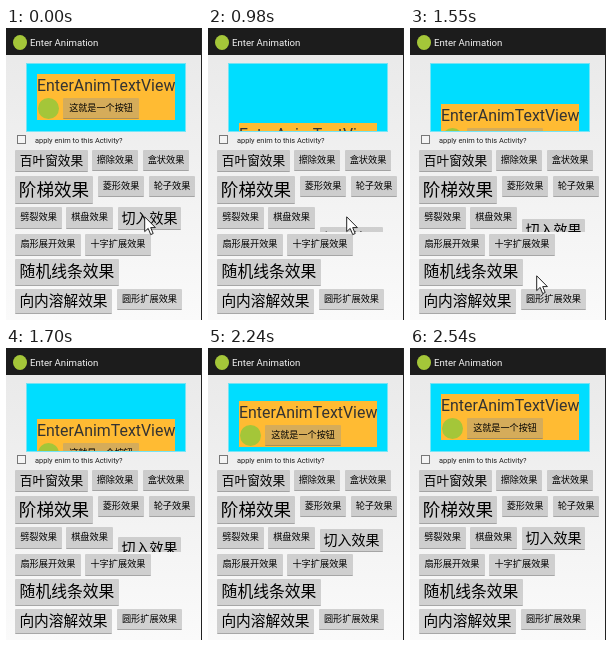
An HTML page that plays this animation: 196x292 px, repeating every 2850 ms.

```html
<!DOCTYPE html>
<html lang="en">
<head>
<meta charset="utf-8">
<title>Enter Animation</title>
<style>
  html, body { margin: 0; width: 100%; height: 100%; overflow: hidden; }
  #stage {
    position: relative; width: 196px; height: 292px; overflow: hidden;
    background: linear-gradient(#e8e8e8, #fafafa);
    font-family: Roboto, sans-serif; color: #222;
  }
  #stage div, #cursor { position: absolute; box-sizing: border-box; white-space: nowrap; }
  #bar { left: 0; top: 0; width: 196px; height: 27px; background: #1c1c1c; }
  #edge { left: 195px; top: 0; width: 1px; height: 292px; background: #222; }
  #title { left: 24px; top: 5px; font-size: 9.6px; line-height: 20px; color: #f4f4f4; }
  .dot { border-radius: 50%; background: #a4c639; }
  #bar .dot { left: 7px; top: 7px; width: 14px; height: 15px; }
  #panel {
    left: 21px; top: 36px; width: 158px; height: 67px; overflow: hidden;
    background: #00ddff; outline: 1px solid rgba(0, 221, 255, .5);
  }
  #card { left: 10px; top: 10px; width: 138px; height: 46px; background: #ffbb33; }
  #label { left: 0; top: 0; font-size: 15.9px; line-height: 24px; color: #333; }
  #card .dot { left: 1px; top: 24px; width: 21px; height: 21px; }
  #box { left: 11px; top: 107px; width: 9px; height: 9px; border: 1px solid #777; background: #f4f4f4; }
  #check { left: 29px; top: 107px; font-size: 7.4px; line-height: 11px; }
  #slot { left: 112px; top: 179px; width: 63px; height: 25px; overflow: hidden; }
  #stage .btn {
    background: rgba(150, 150, 150, .4); color: #000; text-align: center;
    border-radius: 1px; border-bottom: 1px solid rgba(90, 90, 90, .35);
    font-family: "Noto Sans CJK SC", "Noto Sans CJK", "Noto Sans CJK JP", sans-serif;
  }
  #cursor { left: 0; top: 0; }
</style>
</head>
<body>
<div id="stage">
  <div id="bar"><div class="dot"></div><div id="title">Enter Animation</div></div>
  <div id="panel">
    <div id="card"><div id="label">EnterAnimTextView</div><div class="dot"></div></div>
  </div>
  <div id="box"></div>
  <div id="check">apply enim to this Activity?</div>
  <div id="slot"></div>
  <div id="edge"></div>
  <svg id="cursor" width="13" height="20" viewBox="0 0 13 20">
    <path d="M.7 .8V15.6L4.2 12.4 6.7 18.6 9.2 17.5 6.7 11.6H11.4Z" fill="#fff" stroke="#222" stroke-width="1"/>
  </svg>
</div>
<script>
  const $ = id => document.getElementById(id);

  function addButton(parent, text, x, y, w, h, size = 9.2) {
    const el = document.createElement('div');
    el.className = 'btn';
    el.textContent = text;
    el.style.cssText = `left:${x}px;top:${y}px;width:${w}px;height:${h}px;` +
      `font-size:${size}px;line-height:${h - 3}px`;
    parent.insertBefore(el, parent === $('stage') ? $('cursor') : null);
    return el;
  }

  [
    ['百叶窗效果', 9, 122, 73, 22, 12.7],
    ['擦除效果', 86, 122, 46, 21],
    ['盒状效果', 137, 122, 46, 21],
    ['阶梯效果', 9, 148, 78, 28, 17.6],
    ['菱形效果', 92, 148, 46, 21],
    ['轮子效果', 143, 148, 46, 21],
    ['劈裂效果', 9, 179, 47, 22],
    ['棋盘效果', 60, 179, 47, 22],
    ['扇形展开效果', 9, 206, 66, 22],
    ['十字扩展效果', 79, 206, 66, 22],
    ['随机线条效果', 9, 231, 104, 27, 15.8],
    ['向内溶解效果', 9, 261, 97, 25, 14.7],
    ['圆形扩展效果', 111, 261, 65, 21]
  ].forEach(args => addButton($('stage'), ...args));

  addButton($('card'), '这就是一个按钮', 26, 24, 76, 21, 9.1);
  const slideButton = addButton($('slot'), '切入效果', 0, 0, 63, 23, 14);

  const LOOP = 2850, HIDE = 560, START = 643, DURATION = 1775;
  // The screen refreshes only at these moments.
  const ticks = [0, 560, 710, 860, 980, 1130, 1280, 1430, 1550, 1700, 1830, 1970, 2090, 2240, 2390, 2540];
  // time, x, y of the pointer; it leaves at POINTER_END
  const pointer = [[0, 138, 188], [1130, 137, 193], [1280, 129, 220], [1430, 126, 247]];
  const POINTER_END = 1700;

  const shift = (el, x, y) => { el.style.transform = `translate(${x}px,${y}px)`; };

  function render(time) {
    const t = ticks.filter(k => k <= time).pop();
    const p = Math.min(1, Math.max(0, (t - START) / DURATION));
    const left = t < HIDE ? 0 : 1 - p;
    shift($('card'), 0, Math.ceil(60 * left));
    shift(slideButton, 0, Math.floor(25 * left));

    const [, x, y] = pointer.filter(k => k[0] <= t).pop();
    shift($('cursor'), x, y);
    $('cursor').style.visibility = t < POINTER_END ? 'visible' : 'hidden';
  }

  const begin = performance.now();
  function loop() {
    render((performance.now() - begin) % LOOP);
    requestAnimationFrame(loop);
  }
  loop();
</script>
</body>
</html>
```
